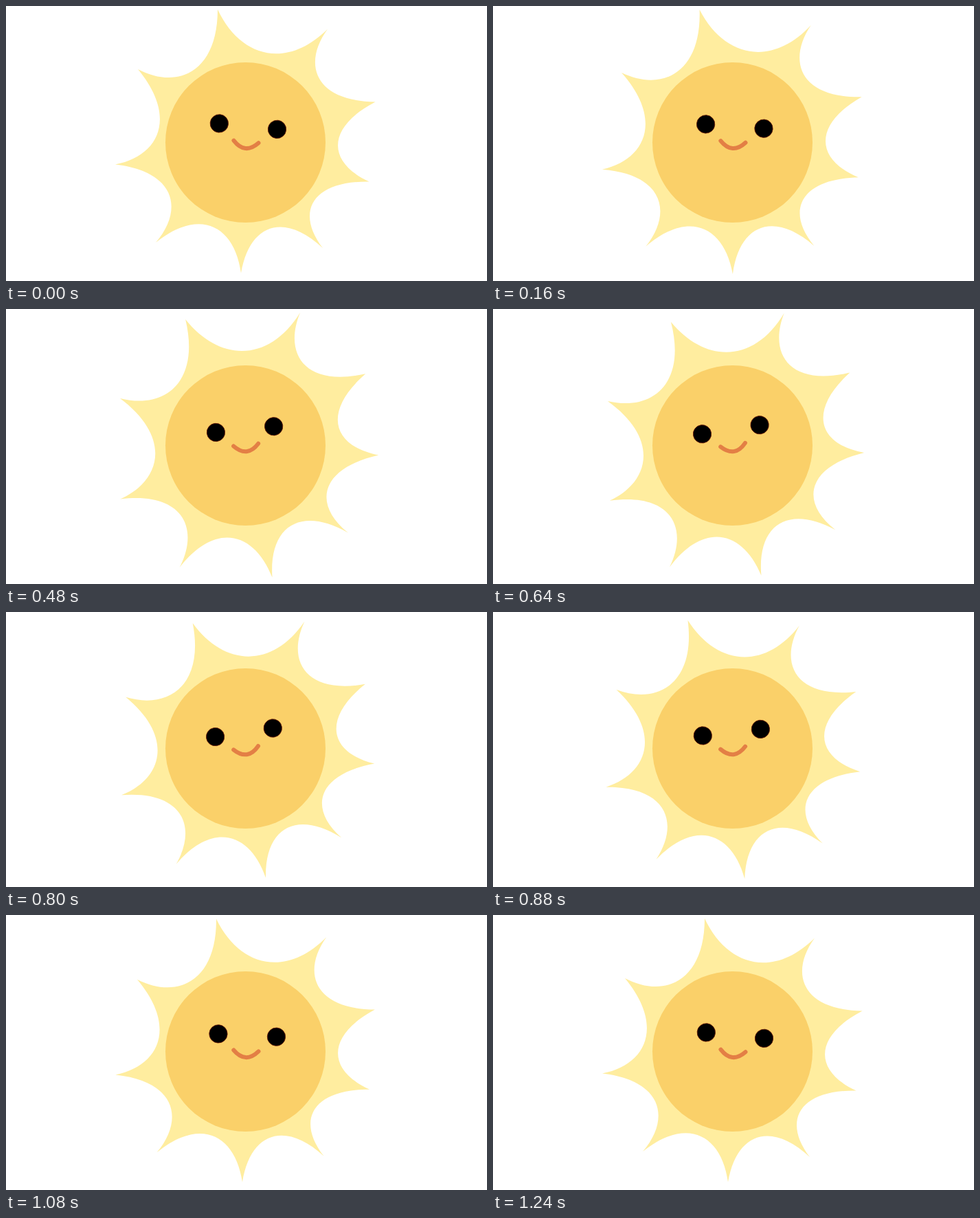
Write an HTML page that moves like this. It is 700 by 400 pixels and loops after 1280 ms.

```html
<!DOCTYPE html>
<html lang="en">
<head>
<meta charset="utf-8">
<title>Swaying sun</title>
<style>
  html, body { margin: 0; width: 100%; height: 100%; overflow: hidden; background: #fff; }
  svg { display: block; width: 700px; height: 400px; }
</style>
</head>
<body>
<svg viewBox="0 0 700 400">
  <path id="rays" fill="#ffed9f"/>
  <circle cx="348.5" cy="198.5" r="116.5" fill="#fad069"/>
  <g id="face">
    <g stroke="#6b1c08" stroke-width=".8">
      <circle cx="-42.3" cy="-24" r="13.2"/>
      <circle cx="42.3" cy="-24" r="13.2"/>
    </g>
    <path d="M-18.8 -1.5Q-.7 17.8 17.4 -1.5" fill="none" stroke="#e37f45" stroke-width="6" stroke-linecap="round"/>
  </g>
</svg>
<script>
  const LOOP = 1280, STEP = 40, DEPTH = 66, SPREAD = 0.215;
  const rays = document.getElementById('rays');
  const face = document.getElementById('face');

  // Ray tips around the pivot, each with the lean of the hollow after it.
  const tips = [
    { x: -42, y: -194.5, lean: 0.49 },
    { x: 118, y: -166, lean: 0.39 },
    { x: 187.5, y: -60, lean: 0.58 },
    { x: 178.5, y: 56, lean: 0.62 },
    { x: 111, y: 152.5, lean: 0.51 },
    { x: -8, y: 189, lean: 0.46 },
    { x: -132, y: 144.5, lean: 0.4 },
    { x: -191, y: 31, lean: 0.4 },
    { x: -158, y: -107.5, lean: 0.41 }
  ];

  // Curve from tip a to tip b, bulging inward; lean shifts and tilts it.
  function hollow(a, b) {
    const dx = b.x - a.x, dy = b.y - a.y, len = Math.hypot(dx, dy);
    const point = (along, depth) =>
      `${a.x + dx * along - dy / len * depth} ${a.y + dy * along + dx / len * depth}`;
    const tilt = 27 - 50 * a.lean;
    return `C${point(a.lean - SPREAD, DEPTH - tilt)} ` +
      `${point(a.lean + SPREAD, DEPTH + tilt)} ${b.x} ${b.y}`;
  }
  rays.setAttribute('d', `M${tips[0].x} ${tips[0].y}` +
    tips.map((tip, i) => hollow(tip, tips[(i + 1) % tips.length])).join('') + 'Z');

  const ease = p => p < 0.5 ? 2 * p * p : 1 - 2 * (1 - p) * (1 - p);

  // Rises from 0 to 1 at peak, then falls back to 0 at end.
  function swing(t, peak, end) {
    if (t >= end) return 0;
    return ease(t < peak ? t / peak : (end - t) / (end - peak));
  }

  function draw(now) {
    const t = Math.floor((now % LOOP) / STEP) * STEP;
    const turn = -14.7 * swing(t, 600, 1160);
    const size = 1 + 0.0295 * swing(t, 460, 860);
    const tilt = 5.74 - 15 * swing(t, 720, 1240);
    rays.setAttribute('transform', `translate(350 199.5) rotate(${turn}) scale(${size})`);
    face.setAttribute('transform', `translate(350 199) rotate(${tilt})`);
  }

  const start = performance.now();
  function tick() {
    draw(performance.now() - start);
    requestAnimationFrame(tick);
  }
  tick();
</script>
</body>
</html>
```
